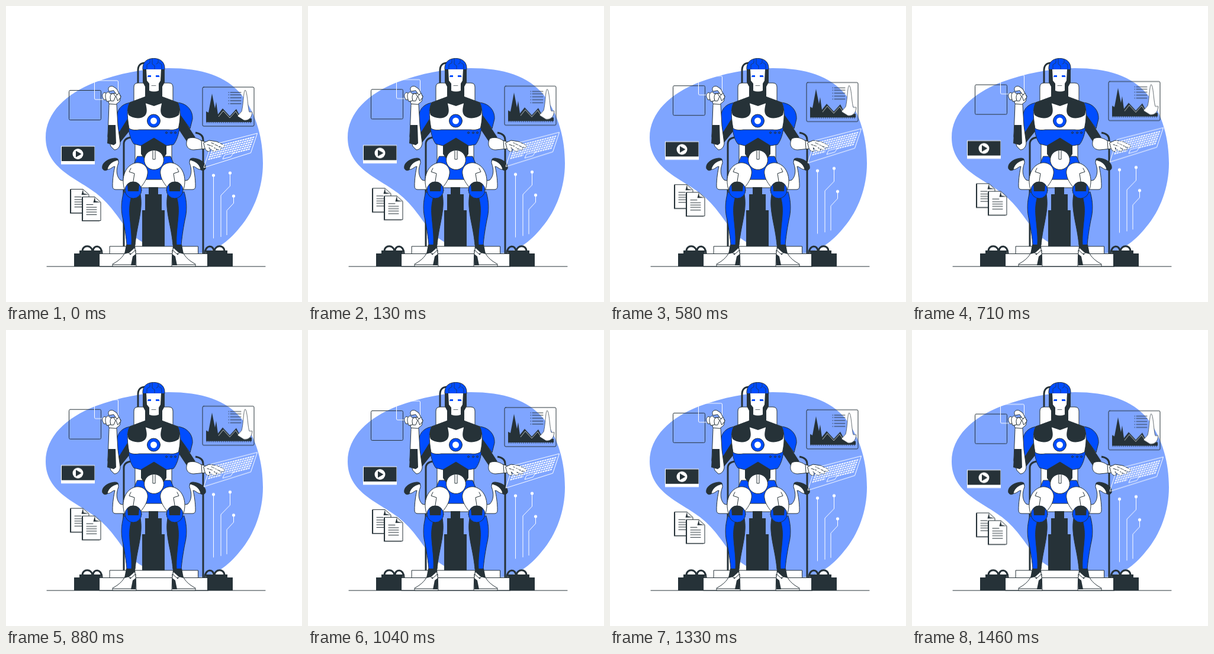
An HTML page for the animation above (1.5 s loop, 500 by 500 pixels).

```html
<!DOCTYPE html>
<html lang="en">
<head>
<meta charset="utf-8">
<title>Robot at the controls</title>
<style>
  html, body { margin: 0; width: 100%; height: 100%; overflow: hidden; background: #fff; }
  svg { display: block; width: 100vw; height: 100vh; }
  .float { animation: float 1.5s steps(18) -4ms infinite; }
  @keyframes float {
    0%, 100% { transform: translateY(0); }
    50% { transform: translateY(-10px); }
  }
  .ink { fill: #263238; }
  .blue { fill: #004dff; }
  .white { fill: #fff; }
  .edge { stroke: #263238; stroke-width: 1; stroke-linejoin: round; stroke-linecap: round; }
  .line { fill: none; stroke: #263238; stroke-width: 1; stroke-linecap: round; stroke-linejoin: round; }
  .tube { fill: none; stroke: #263238; stroke-width: 3; }
  .glow { fill: none; stroke: #fff; stroke-width: 1; stroke-linejoin: round; }
  .thin { stroke-width: .7; }
  .keys { stroke-width: 2.4; stroke-dasharray: 3.2 1; }
</style>
</head>
<body>
<svg viewBox="0 0 500 500">
  <defs>
    <g id="page">
      <path class="ink" d="M-1 0H18L29 9V41H-1Z"/>
      <path class="white edge" d="M1 0H21L31 9V40H1Z"/>
      <path class="ink" d="M21 0L18.500 9.500L31 9L22 7Z"/>
      <path class="line" d="M7 13H18M7 17.500H24M7 21.500H24M7 25.500H24M7 30H24"/>
    </g>

    <g id="base">
      <rect class="ink" x="115" y="418" width="43" height="22"/>
      <rect class="ink" x="124" y="413" width="36" height="6"/>
      <path class="tube" d="M129 414C129 403 145 403 146 414M147 414C147 403 162 403 162 418"/>
    </g>

    <g id="arm-rest">
      <path class="ink edge" d="M163 274C161 266 171 258 184 257C191 257 191 262 186 265L172 276C168 279 164 278 163 274Z"/>
      <path class="white edge" d="M189 260C180 262 173 267 171 276C176 277 180 271 184 271C182 279 180 292 180 304Q180 310 185 310H207V297L193 294C187 288 185 278 190 265Z"/>
    </g>

    <g id="leg">
      <path class="white edge" d="M200 309C194 291 201 269 219 265C233 263 241 274 239 284C238 293 232 301 227 307Z"/>
      <path class="line" d="M211 274L208 280L217 283L215 296"/>
      <path class="ink edge" d="M207 318H227C230 335 227 350 224 366C221 381 219 392 218 404H210Z"/>
      <path class="blue edge" d="M199 314C194 331 194 347 198 362C201 378 203 391 204 404H212C213 386 210 369 209 354C208 342 209 332 212 322Z"/>
      <circle class="blue edge" cx="215" cy="311" r="14"/>
      <path class="ink" d="M205 302C207 295 222 295 225 302L224 313H206Z"/>
      <path class="white edge" d="M203 412L210 420L219 412L220 440H180V436C187 432 198 426 203 412Z"/>
      <path class="ink" d="M203 403H218L219 419L214 423L211 438H219L220 424L217 409L208 417L200 419Z"/>
      <path class="line" d="M181 437H219"/>
    </g>
  </defs>

  <path fill="#7fa5ff" d="M67 222C67 180 102 148 150 129C190 114 235 105 275 105C330 105 372 118 398 150C424 184 434 225 434 266C434 305 420 345 395 374C376 398 350 418 322 418C270 418 235 408 210 383C190 360 180 338 152 316C120 291 67 275 67 222Z"/>

  <!-- Floating panels -->
  <g class="float">
    <rect class="line" x="106.500" y="142.500" width="54" height="50" rx="2"/>
    <rect class="glow" x="149.500" y="126" width="40" height="32" rx="2"/>

    <rect class="line" x="332" y="137" width="87" height="66" rx="2"/>
    <path class="ink" d="M338 196V178L342 180L348 148L353 173L355 162L358 183L366 173L378 186L389 174L397 189L415 190V196Z"/>
    <path class="white edge thin" d="M391 186L398 178C401 168 401 143 404 142C408 145 408 170 411 179L416 179C415 191 408 194 402 193Z"/>
    <path class="glow thin" d="M359 187L367 177L378 189L388 178L394 187"/>
    <path class="line" stroke-dasharray="1 2.500" d="M339 197H415"/>
    <path class="line" d="M379 146H397M379 150H397M379 155H397M379 160H397M379 165H397"/>
    <path class="line" d="M376 146h.5M376 150h.5M376 155h.5M376 160h.5M376 165h.5"/>

    <rect class="white" x="93" y="236.500" width="57" height="31"/>
    <rect class="ink" x="94" y="237.500" width="55.500" height="24.500"/>
    <circle class="white" cx="121.500" cy="250" r="9"/>
    <path class="ink" d="M118 244.500V255.500L127.500 250Z"/>

    <use href="#page" x="109" y="309.500"/>
    <use href="#page" x="129" y="322.500"/>

    <path class="glow" d="M350.500 286V392.500M378.500 282V304L363 320V390M384.500 321V333L373 345.500V387"/>
    <g class="white">
      <circle cx="350.500" cy="286" r="2.600"/>
      <circle cx="378.500" cy="282" r="2.600"/>
      <circle cx="384.500" cy="321" r="2.600"/>
    </g>
  </g>

  <!-- Chair -->
  <path class="tube" d="M236 96C227 96 223 100 223 109V134"/>
  <path class="tube" d="M199 406V233Q199 224 210 222M333 418V226Q333 216 320 214"/>
  <path class="white edge" d="M218 268V230L216 220V137Q216 130 223 130H275Q282 130 282 137V220L280 230V268Z"/>
  <rect class="white edge" x="224" y="292" width="52" height="15"/>
  <path class="ink" d="M241 306H257V318H263V345H268V406H230V345H235V318H241Z"/>
  <rect class="white edge" x="158" y="418.500" width="184" height="21.500"/>
  <rect class="white edge" x="175.500" y="406" width="149" height="12.500"/>
  <use href="#base"/>
  <use href="#base" transform="matrix(-1 0 0 1 498 0)"/>
  <path class="line" d="M69 440H438"/>
  <use href="#arm-rest"/>
  <use href="#arm-rest" transform="matrix(-1 0 0 1 500 0)"/>

  <!-- Arms -->
  <path class="ink" d="M205 182L211 208L190 234L186 216Z"/>
  <path class="blue edge" d="M211 163C195 165 185 176 188 193L189 217L206 190Z"/>
  <path class="white edge" d="M174 167C174 161 187 161 187 167L189 202L193 232C192 240 187 243 183 243L177 237L172 221Z"/>
  <path class="ink" d="M173 201H185L186 232L182 235L171 232Z"/>

  <path class="ink" d="M294 182L320 222L306 230L290 206Z"/>
  <path class="blue edge" d="M289 163C306 164 316 177 315 191L311 207L295 185Z"/>
  <path class="white edge" d="M307 224C313 221 322 222 329 227L341 231L337 241L317 243C308 243 301 236 307 224Z"/>
  <path class="line" d="M330 227L331 241"/>

  <!-- Torso -->
  <path class="blue edge" d="M222 254H278L284 268L266 293H234L216 268Z"/>
  <path class="ink" d="M228 233L250 222L271 233V250L264 260H235L228 250Z"/>
  <path class="white edge" d="M236 153L209 163C203 174 205 193 209 212L290 212C295 193 296 174 290 163L263 153Z"/>
  <path class="blue edge" d="M207 206C211 210 219 210 225 209H275C282 210 288 209 293 205C292 217 288 228 283 234L271 236L250 223L228 236L216 233C211 227 208 217 207 206Z"/>
  <path class="ink" d="M236 153L209 163C205 171 205 178 207 184C214 190 228 192 235 185C239 180 238 174 236 165Z"/>
  <path class="ink" d="M263 153L290 163C294 171 294 178 292 184C285 190 271 192 264 185C260 180 261 174 263 165Z"/>
  <path class="ink" d="M235 136H264V164L250 169L235 164Z"/>
  <circle class="blue edge" cx="249.500" cy="194" r="11"/>
  <circle class="white" cx="249.500" cy="194" r="5.500"/>
  <g class="line">
    <circle cx="271" cy="214" r="1.500"/>
    <circle cx="279" cy="214" r="1.500"/>
    <circle cx="286" cy="214" r="1.500"/>
  </g>
  <circle class="white edge" cx="250" cy="260" r="16.500"/>
  <path class="white edge" d="M248 244V259H252V244"/>

  <!-- Head -->
  <path class="ink" d="M231 105H268V129L263 138L258 146H241L236 138L231 129Z"/>
  <path class="blue edge" d="M231 107C230 95 238 88.500 249.500 88.500S269 95 268 107Z"/>
  <path class="line thin" d="M238 106V99L243 96V91M247 90V98L251 101V106M257 91V96L254 98M263 106V99L259 96"/>
  <path class="white" d="M237 107H262L261 126L258 131V143Q250 146 242 143V131L238 126Z"/>
  <path class="blue" d="M240 117H245V120H239ZM253 117H258.500L259.500 120H253Z"/>
  <path class="line thin" d="M246 134.500H253"/>

  <use href="#leg"/>
  <use href="#leg" transform="matrix(-1 0 0 1 500 0)"/>

  <!-- Hands -->
  <g class="white edge">
    <path d="M174 165L171 155L177 148L189 147L194 152L192 161L186 166Z"/>
    <path d="M174 144C170 137 177 134 181 136L187 140L191 148L187 150L182 143Z"/>
    <path d="M165 158C161 151 163 147 167 146L172 150L170 158Z"/>
    <path d="M170 161C166 151 168 146 173 145L178 150L176 160Z"/>
    <path d="M177 160C174 151 178 147 182 148L185 153L182 160Z"/>
    <path d="M186 152L191 147L194 154L189 160Z"/>

    <path d="M334 231L343 227L356 229L366 234C371 236 369 240 365 239L357 236L363 240C364 243 361 244 357 242L351 239L356 243C355 246 351 246 347 243L343 239L345 245C341 247 337 244 336 240Z"/>
    <path class="line" d="M340 234L349 237M347 231L357 236"/>
  </g>

  <g class="float">
    <path class="glow" d="M424.500 215L413.500 248L334 273L346.500 235Z"/>
    <path class="glow" d="M369 252L366 258.500L380 254.500L384 248Z"/>
    <path class="glow keys" transform="matrix(1 -.25 -.37 1 349 239)"
      d="M0 0H71M0 4H71M0 8H71M0 12H71M0 16H71M0 20H22M42 20H71"/>
  </g>
</svg>
</body>
</html>
```
